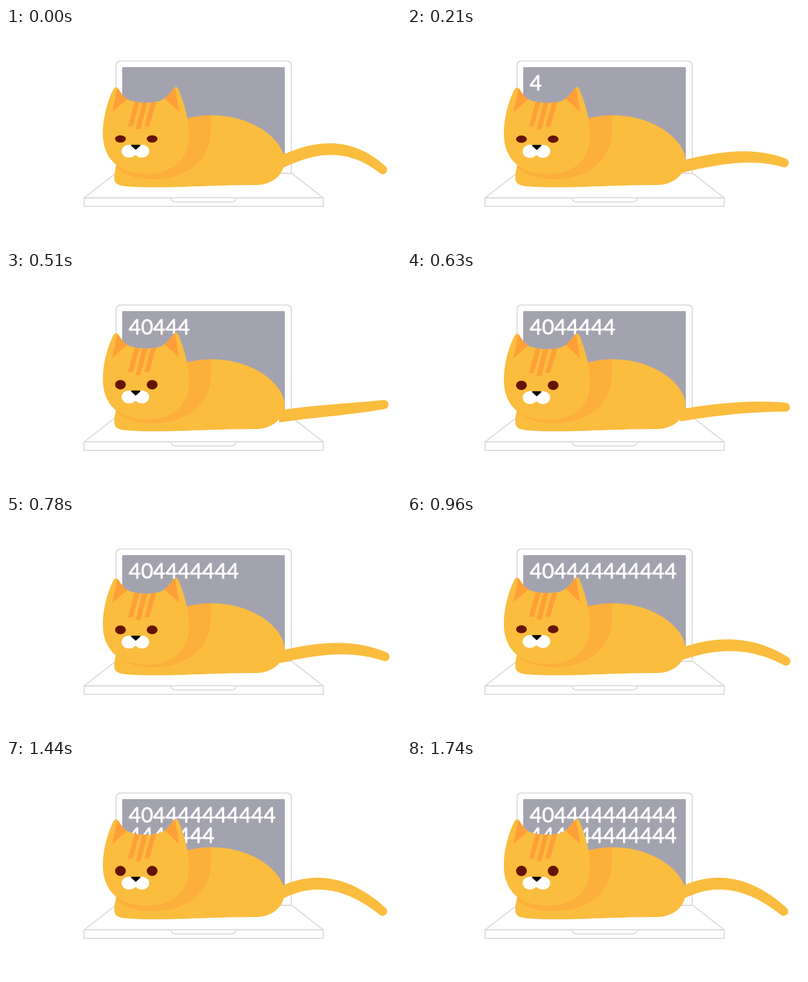
Write an HTML page that moves like this. It is 673 px wide and 370 px high and loops after 1.8 s.

```html
<!DOCTYPE html>
<html lang="en">
<head>
<meta charset="utf-8">
<title>Cat on a laptop</title>
<style>
  html, body { margin: 0; width: 100%; height: 100%; overflow: hidden; background: #fff; }
  svg { display: block; width: 673px; height: 370px; }
  text { font: 400 36px Lato, Inter, sans-serif; fill: #fff; stroke: #fff; stroke-width: .8; }
  .line { fill: #fff; stroke: #d2d2d2; stroke-width: 1.5; stroke-linejoin: round; }
  .fur { fill: #fbbd3e; }
  .mark { fill: #ff9f38; }
</style>
</head>
<body>
<svg viewBox="0 0 673 370">
  <defs>
    <path id="skull" d="M182 107Q187 97 192 105C199 117 205 122 212 124C226 129 250 129 262 125C270 122 276 116 285 104Q290 97.5 294 105C304 130 312 158 312 183C312 225 285 249.5 240 249.5C190 249.5 165 222 165 181C165 155 172 128 182 107Z"/>
    <clipPath id="inside"><use href="#skull"/></clipPath>
  </defs>

  <!-- laptop -->
  <path class="line" d="M187.5 249V64.500Q187.500 56.500 195.500 56.500H478Q486 56.500 486 64.500V249Z"/>
  <rect x="198" y="67" width="277" height="169" rx="1" fill="#a3a3b0"/>
  <text class="row" x="209" y="107"></text>
  <text class="row" x="209" y="142"></text>
  <path class="line" d="M187 249H487L540.500 291H133Z"/>
  <path class="line" d="M133 291H540.500V305.500H133Z"/>
  <path class="line" d="M281.500 291.500Q282 298 289 298H384Q391 298 392 291.500"/>

  <!-- cat -->
  <path id="tail" class="fur"/>
  <path class="fur" d="M188 236C184 248 184 256 185 261C187 270 200 271 215 272C280 275 340 269 428 269C455 268 475 250 474.500 226C474 195 425 149.500 350 149.500C330 149.500 312 154 300 157Z"/>
  <path fill="#fcaf3b" d="M349 149.500V175C349 225 310 259 250 259C220 259 199 251 187 238L300 157C312 154 330 149.500 349 149.500Z"/>
  <g id="head">
    <use href="#skull" class="fur"/>
    <g class="mark" clip-path="url(#inside)">
      <path d="M190 102L181 144L207 121.500V102Z"/>
      <path d="M288 101L295 144L270.500 121V101Z"/>
      <path d="M219.500 125H228L216 168.500H208Z"/>
      <path d="M233 125H241.500L229 173.500H221Z"/>
      <path d="M248 125H256.500L244 168.500H236Z"/>
    </g>
    <g fill="#fff">
      <ellipse cx="209.500" cy="211" rx="12.500" ry="11"/>
      <ellipse cx="231.500" cy="211" rx="12.500" ry="11"/>
      <rect x="208" y="200" width="25" height="18"/>
    </g>
    <path d="M214 201H228L221 207.500Z" stroke="#000" stroke-width="2" stroke-linejoin="round"/>
    <g fill="#651400">
      <ellipse class="eye" cx="195" cy="190" rx="9.200"/>
      <ellipse class="eye" cx="249" cy="190" rx="9.200"/>
    </g>
  </g>
</svg>
<script>
const LOOP = 1800, STEP = 30, ROW = 12, TAIL_X = 464;
const message = '40' + '4'.repeat(22);

// time, head drop, eye openness, four tail control heights, tail tip x
const poses = [
  [0, 0, .7, 232, 202.7, 192.1, 243, 642],
  [210, .35, .7, 238.5, 224.2, 211.3, 231, 643],
  [510, 3.1, .9, 247.5, 238.4, 235.3, 227, 644],
  [780, 5, .84, 242, 227.9, 217.8, 241, 646],
  [1140, 2.4, .7, 234, 204.2, 210.5, 254.5, 645],
  [1440, 0, .96, 230, 197.9, 208.4, 259.5, 642],
  [1740, 0, 1, 230, 197.9, 208.4, 259.5, 642]
];

const rows = document.querySelectorAll('.row');
const eyes = document.querySelectorAll('.eye');
const head = document.getElementById('head');
const tail = document.getElementById('tail');

const slope = (i, k) =>
  (poses[i + 1][k] - poses[i][k]) / (poses[i + 1][0] - poses[i][0]);

// Slope at a pose, flat at turning points so nothing overshoots
function tangent(i, k) {
  if (i === 0) return slope(0, k);
  if (i === poses.length - 1) return slope(i - 1, k);
  const p = slope(i - 1, k), q = slope(i, k);
  return p * q <= 0 ? 0 : 2 * p * q / (p + q);
}

function poseAt(t) {
  let i = 0;
  while (i < poses.length - 2 && t >= poses[i + 1][0]) i++;
  const span = poses[i + 1][0] - poses[i][0];
  const u = (t - poses[i][0]) / span, v = 1 - u;
  return poses[i].map((a, k) =>
    a * v * v * (1 + 2 * u) + poses[i + 1][k] * u * u * (1 + 2 * v) +
    span * u * v * (v * tangent(i, k) - u * tangent(i + 1, k)));
}

// Tapered band around a cubic centre line, with a round tip
function tailPath(a, b, c, d, tipX) {
  const top = [], bottom = [], n = 40, width = tipX - TAIL_X;
  for (let i = 0; i <= n; i++) {
    const u = i / n, v = 1 - u;
    const x = TAIL_X + width * u;
    const y = a * v ** 3 + 3 * b * u * v * v + 3 * c * u * u * v + d * u ** 3;
    const dy = 3 * ((b - a) * v * v + 2 * (c - b) * u * v + (d - c) * u * u);
    const r = (10.3 - 2.6 * u ** 3) / Math.hypot(width, dy);
    const point = s => `${(x + s * dy * r).toFixed(2)} ${(y - s * width * r).toFixed(2)}`;
    top.push(point(1));
    bottom.unshift(point(-1));
  }
  return `M${top.join('L')}A7.7 7.7 0 0 1 ${bottom.join('L')}Z`;
}

function draw() {
  const now = performance.now() % LOOP;
  const t = Math.min(LOOP - 2 * STEP, Math.floor(now / STEP) * STEP);
  const [, drop, open, ...curve] = poseAt(t);
  const typed = message.slice(0, Math.max(0, Math.floor((t - 120) * 15 / 1000)));
  rows.forEach((row, i) => row.textContent = typed.slice(i * ROW, (i + 1) * ROW));
  head.setAttribute('transform', `translate(0 ${drop})`);
  eyes.forEach(eye => eye.setAttribute('ry', 9 * open));
  tail.setAttribute('d', tailPath(...curve));
  requestAnimationFrame(draw);
}
draw();
</script>
</body>
</html>
```
